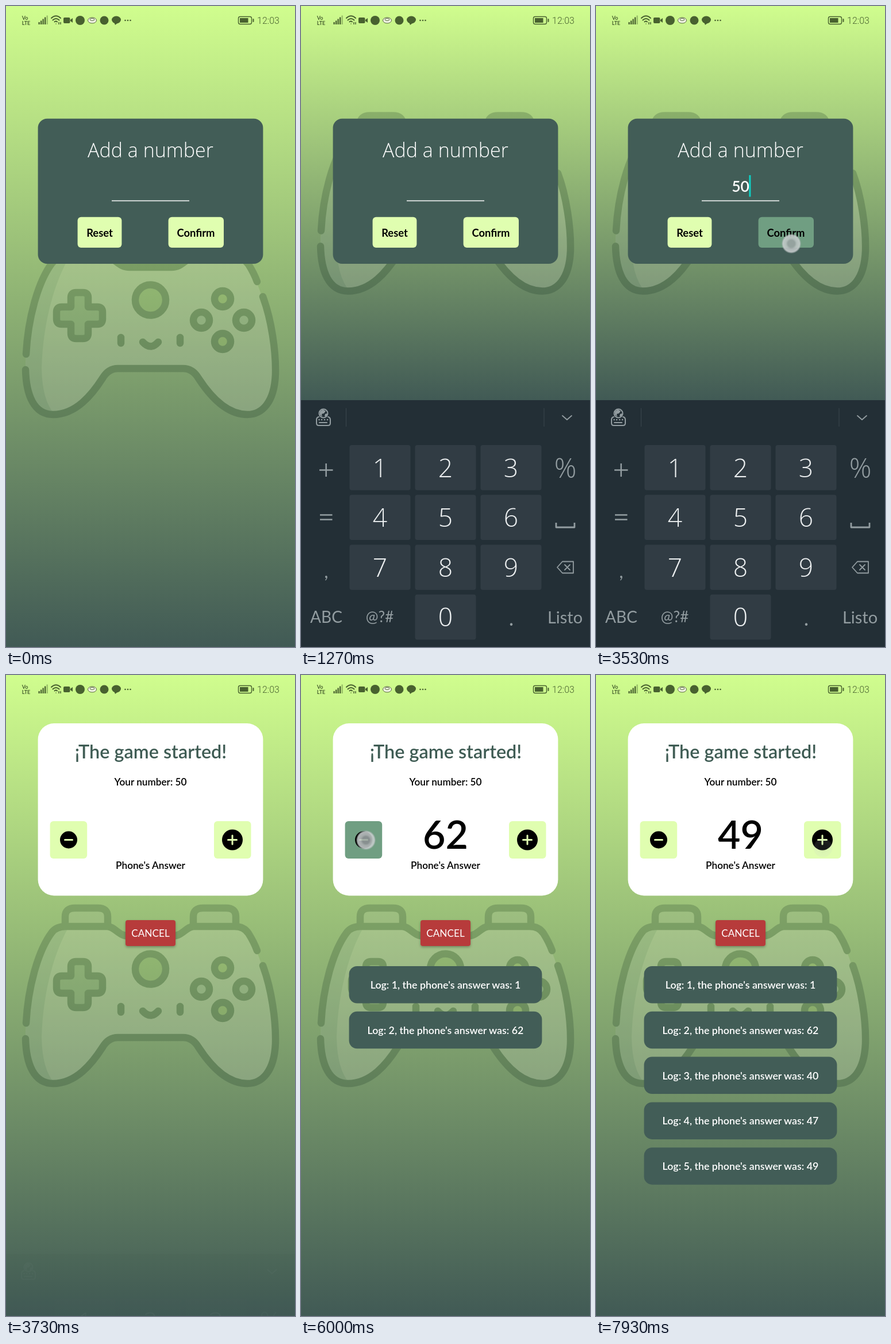
Write an HTML page that moves like this. It is 503x1114 px and loops after 8 s.

```html
<!DOCTYPE html>
<html lang="en">
<head>
<meta charset="utf-8">
<title>Number game</title>
<style>
  html, body { margin: 0; width: 100%; height: 100%; overflow: hidden; background: #fff; }
  svg { display: block; width: 100%; height: 100%; }
  text { font-family: Lato, "Open Sans", sans-serif; text-anchor: middle; white-space: pre; }
  .line { fill: none; stroke-linecap: round; stroke-linejoin: round; }
  .btn { fill: #e0feb0; }
  .btn.down { fill: #709e82; }
  .semi { font-weight: 600; }
  .bold { font-weight: 700; }
  .thin { font-family: "Open Sans", sans-serif; font-weight: 300; }
</style>
</head>
<body>
<svg viewBox="0 0 503 1114">
  <defs>
    <linearGradient id="sky" x1="0" y1="0" x2="0" y2="1">
      <stop offset="0" stop-color="#d0fd8e"/><stop offset="1" stop-color="#415a55"/>
    </linearGradient>
    <radialGradient id="glow">
      <stop offset=".35" stop-color="#9aa3a3"/><stop offset=".55" stop-color="#bcc3c3"/>
      <stop offset=".85" stop-color="#c9cecf"/><stop offset="1" stop-color="#aab1b3" stop-opacity=".2"/>
    </radialGradient>
    <filter id="soft" x="-20%" y="-20%" width="140%" height="150%">
      <feDropShadow dx="0" dy="2" stdDeviation="2" flood-opacity=".3"/>
    </filter>
  </defs>

  <rect width="503" height="1114" fill="#fff"/>
  <rect id="bg" width="503" height="1114" fill="url(#sky)"/>

  <!-- game controller -->
  <g id="pad" opacity=".2">
    <g fill="#dce0d2">
      <path d="M35 605C38 545 55 480 80 447Q88 437 104 437H176C190 437 195 454 215 454H288C308 454 313 437 327 437H398Q414 437 422 449C450 500 470 590 469 640C467 690 445 710 420 710C380 710 350 670 335 647Q325 630 308 630H195Q178 630 168 647C150 675 122 710 82 710C48 710 35 675 34 632Z"/>
      <path id="shoulder" d="M103 436V420Q103 405 120 405H160Q177 405 177 420V436Z" fill="#a8b89c"/>
      <use href="#shoulder" transform="matrix(-1 0 0 1 503 0)"/>
    </g>
    <path d="M35 605C38 545 55 480 80 447Q88 437 108 440C80 490 64 560 62 630Q63 685 84 709C48 710 35 675 34 632Z" fill="#a3b5a8"/>
    <g class="line" stroke="#0e2a1c" stroke-width="12.5">
      <path d="M35 605C38 545 55 480 80 447Q88 437 104 437H176C190 437 195 454 215 454H288C308 454 313 437 327 437H398Q414 437 422 449Q432 465 437 479"/>
      <path d="M447 505C462 545 470 600 469 640C467 690 445 710 420 710C380 710 350 670 335 647Q325 630 308 630H195Q178 630 168 647C150 675 122 710 82 710C48 710 35 675 34 632"/>
      <path id="ear" d="M103 436V420Q103 405 120 405H160Q177 405 177 420V436"/>
      <use href="#ear" transform="matrix(-1 0 0 1 503 0)"/>
      <path d="M122 498H134Q143 498 143 507V523H159Q168 523 168 532V544Q168 553 159 553H143V569Q143 578 134 578H122Q113 578 113 569V553H97Q88 553 88 544V532Q88 523 97 523H113V507Q113 498 122 498Z" fill="#7b9a76"/>
      <circle cx="251.5" cy="511" r="26.5" fill="#8cb464"/>
      <g fill="#9cc05c">
        <circle cx="377" cy="509" r="14"/><circle cx="377" cy="583" r="14"/>
        <g fill="#a9bbb0"><circle cx="340" cy="546" r="14"/><circle cx="414" cy="546" r="14"/></g>
      </g>
      <path d="M200 576v10M303 576v10M238 584Q251.500 599 265 584"/>
    </g>
  </g>

  <!-- status bar -->
  <g fill="#48612f" stroke="none">
    <text class="bold" x="33" y="23.500" font-size="9">Vo</text>
    <text class="bold" x="35" y="33" font-size="9">LTE</text>
    <path d="M56.500 28h2.300v4h-2.300zM60 25.500h2.300V32H60zM63.500 22.500h2.300V32h-2.300zM67 19.500h2.300V32H67z"/>
    <path d="M70.500 16.500h2.300V32h-2.300z" opacity=".4"/>
    <g class="line" stroke="#48612f" stroke-width="2">
      <path d="M79 21Q87 13.500 95 21M81.500 24.500Q87 19.500 92.500 24.500M84.500 27.500Q87 25.500 89 27.500"/>
      <path d="M87 31v.1M92 28.500v3M95 28.500v3" stroke-width="1.500"/>
    </g>
    <rect x="100" y="20" width="11.500" height="10" rx="2"/><path d="M112 24l4-3v8l-4-3z"/>
    <circle cx="129" cy="25" r="8"/>
    <g fill="#f0f4e2" stroke="#59683f" stroke-width="1">
      <ellipse cx="150" cy="25" rx="7.500" ry="5"/><ellipse cx="150" cy="23.500" rx="4" ry="2"/>
    </g>
    <circle cx="171" cy="25" r="7.500"/>
    <ellipse cx="192" cy="24" rx="8" ry="6.500"/><path d="M188 28l2 5 5-4z"/>
    <circle cx="207.500" cy="25" r="1.300"/><circle cx="212" cy="25" r="1.300"/><circle cx="216.500" cy="25" r="1.300"/>
    <rect x="404.500" y="18.500" width="23" height="13" rx="3" fill="none" stroke="#48612f" stroke-width="1.400"/>
    <rect x="407" y="21" width="14.500" height="8"/><rect x="429.500" y="22" width="2" height="6" rx="1"/>
    <text x="456.500" y="31" font-size="16" style="font-family:Roboto,sans-serif;font-weight:300">12:03</text>
  </g>

  <!-- number entry -->
  <g id="entry">
    <rect x="55.600" y="195.700" width="391.800" height="252.300" rx="16" fill="#425d57"/>
    <text class="thin" x="251.500" y="263" font-size="34" fill="#fff">Add a number</text>
    <text id="typed" class="semi" x="251.500" y="323" font-size="26.500" fill="#fff"></text>
    <rect id="caret" x="251" y="294" width="3" height="37.500" fill="#0cd0c4"/>
    <rect x="184" y="337.700" width="135" height="1.600" fill="#f2f5f3"/>
    <rect class="btn" x="124.600" y="366.800" width="76.800" height="53.200" rx="6"/>
    <text class="bold" x="163" y="401" font-size="18.400">Reset</text>
    <rect id="confirm" class="btn" x="282.600" y="366.800" width="96.400" height="53.200" rx="6"/>
    <text class="bold" x="330.500" y="401" font-size="18.400">Confirm</text>
  </g>

  <!-- game -->
  <g id="game">
    <rect x="55.600" y="84" width="391.800" height="299.500" rx="28" fill="#fff"/>
    <text class="semi" x="252" y="145" font-size="32.400" fill="#3f5c54">¡The game started!</text>
    <text class="semi" x="251.500" y="191.500" font-size="17.200">Your number: 50</text>
    <text id="answer" class="semi" x="251.500" y="302" font-size="68"></text>
    <text class="semi" x="251.500" y="337" font-size="17.200">Phone's Answer</text>
    <rect id="minus" class="btn" x="76.600" y="254" width="64.600" height="65" rx="6"/>
    <rect id="plus" class="btn" x="362" y="254" width="64.500" height="65" rx="6"/>
    <circle cx="109" cy="286.500" r="15"/><circle cx="394" cy="286.500" r="18"/>
    <path class="line" d="M102.500 286.500h13M386.500 286.500h15M394 279v15" stroke="#e0feb0" stroke-width="3"/>
    <rect x="208" y="426" width="87" height="45" rx="4" fill="#b73a3a" filter="url(#soft)"/>
    <text x="251.500" y="455" font-size="17.200" fill="#fff">CANCEL</text>
    <g id="logs"></g>
  </g>

  <!-- keyboard -->
  <g id="keys">
    <rect y="685" width="503" height="860" fill="#232f36"/>
    <path d="M78.500 699v32M423 699v32" stroke="#3b474e"/>
    <g class="line" stroke="#939da1" stroke-width="2">
      <path d="M31 714q-4 1-4 5v6q0 4 4 4h16q4 0 4-4v-6q0-4-4-5M32 724h13"/>
      <path d="M31.500 719h.1M36 719h.1M41 719h.1M46 719h.1" stroke-width="2.500"/>
      <circle cx="39" cy="708" r="7.500"/>
      <path d="M455 712l8 7 8-7" stroke-width="1.800"/>
      <path d="M32 806.500h23.500M43.700 795v23M33 884.500h21.500M33 892.500h21.500" stroke-width="2.500" stroke-linecap="butt"/>
      <path d="M444 898v8h32v-8" stroke-width="2.800" stroke-linecap="butt"/>
      <path d="M446 975.500l9-10h19v20h-19zM459 971l9 9M468 971l-9 9" stroke-width="1.800"/>
    </g>
    <path d="M33 705l5-4 5 3-3 4-4 1 1 5-4-4zM42 709l4-1-2 5-3 0z" fill="#939da1"/>
    <g fill="#939da1">
      <text class="thin" x="460" y="819.500" font-size="48">%</text>
      <text x="44" y="994" font-size="32">,</text>
      <text x="366" y="1077" font-size="36">.</text>
      <text x="44" y="1072" font-size="28">ABC</text>
      <text x="137" y="1071" font-size="26">@?#</text>
      <text x="459.500" y="1073" font-size="29">Listo</text>
    </g>
    <g id="digits"></g>
  </g>

  <circle id="touch" r="17" fill="url(#glow)"/>
</svg>

<script>
const $ = id => document.getElementById(id);
const set = (id, attrs) => { for (const k in attrs) $(id).setAttribute(k, attrs[k]); };
const show = (id, on) => { $(id).style.display = on ? '' : 'none'; };
const clamp = v => Math.max(0, Math.min(1, v));

// Rounds: press time, button, phone's answer
const rounds = [
  [4266, 'minus', 1], [5000, 'plus', 62], [6000, 'minus', 40],
  [6733, 'plus', 47], [7733, 'plus', 49]
];
const REPLY = 130;

// Touches: start, end, x, y
const touches = [
  [466, 740, 251, 318], [1733, 2000, 251, 912], [2133, 2460, 251, 1092],
  [2600, 2860, 334, 360], [3466, 3660, 340, 413],
  ...rounds.map(([t, b]) => [t, t + 220, ...(b === 'plus' ? [395, 300] : [113, 287])])
];

$('logs').innerHTML = rounds.map(([, , n], i) => {
  const y = 506 + 78.8 * i;
  return `<g><rect x="83.600" y="${y}" width="335.800" height="64.500" rx="14" fill="#425d57"/>
    <text class="semi" x="251.500" y="${y + 39}" font-size="17.800" fill="#fff">Log: ${i + 1}, the phone's answer was: ${n}</text></g>`;
}).join('');

$('digits').innerHTML = [1, 2, 3, 4, 5, 6, 7, 8, 9, 0].map((n, i) => {
  const x = 84.5 + 114 * (n ? i % 3 : 1), y = 763 + 86.6 * Math.floor(i / 3);
  return `<rect x="${x}" y="${y}" width="106" height="78.500" rx="4" fill="#313c44"/>
    <text class="thin" x="${x + 53}" y="${y + 55.5}" font-size="44.500" fill="#edf0f1">${n}</text>`;
}).join('');

// Keyboard: fraction hidden and opacity
function keyboard(t) {
  if (t < 800 || t >= 4260) return [1, 0];
  if (t < 3600) {
    const off = (1 - clamp((t - 800) / 270)) ** 1.7;
    return [off, 1 - off * 1.05];
  }
  const off = Math.min(.747, (t - 3600) / 178);
  return [off, 1 - off * 1.3];
}

function draw(t) {
  const playing = t >= 3600, small = t >= 800 && !playing;
  show('entry', !playing);
  show('game', playing);
  set('bg', { height: small ? 685 : 1114 });
  set('pad', { transform: `translate(0 ${small ? -214.5 : 0})` });

  const text = t < 1930 ? '' : t < 2260 ? '5' : '50';
  $('typed').textContent = text;
  set('caret', { x: 251 + 7.7 * text.length });
  show('caret', t >= 800 && t < 1260 || t >= 1800 && t < 2800 || t >= 3330);
  $('confirm').classList.toggle('down', t >= 3466);

  const [off, alpha] = keyboard(t);
  set('keys', { transform: `translate(0 ${430 * off})`, opacity: clamp(alpha) });

  const done = rounds.filter(r => t >= r[0] + REPLY);
  $('answer').textContent = done.length ? done.at(-1)[2] : '';
  [...$('logs').children].forEach((g, i) => { g.style.display = i < done.length ? '' : 'none'; });
  for (const b of ['minus', 'plus'])
    $(b).classList.toggle('down', rounds.some(r => r[1] === b && t >= r[0] && t < r[0] + REPLY));

  const hit = touches.find(([a, b]) => t >= a && t < b);
  show('touch', hit);
  if (hit) set('touch', { cx: hit[2], cy: hit[3], opacity: .88 * clamp((hit[1] - t) / 120) });
}

// The picture advances 15 times a second
function tick(now) {
  draw(Math.floor((now % 8000 + 4) * .015) / .015);
  requestAnimationFrame(tick);
}
requestAnimationFrame(tick);
</script>
</body>
</html>
```
